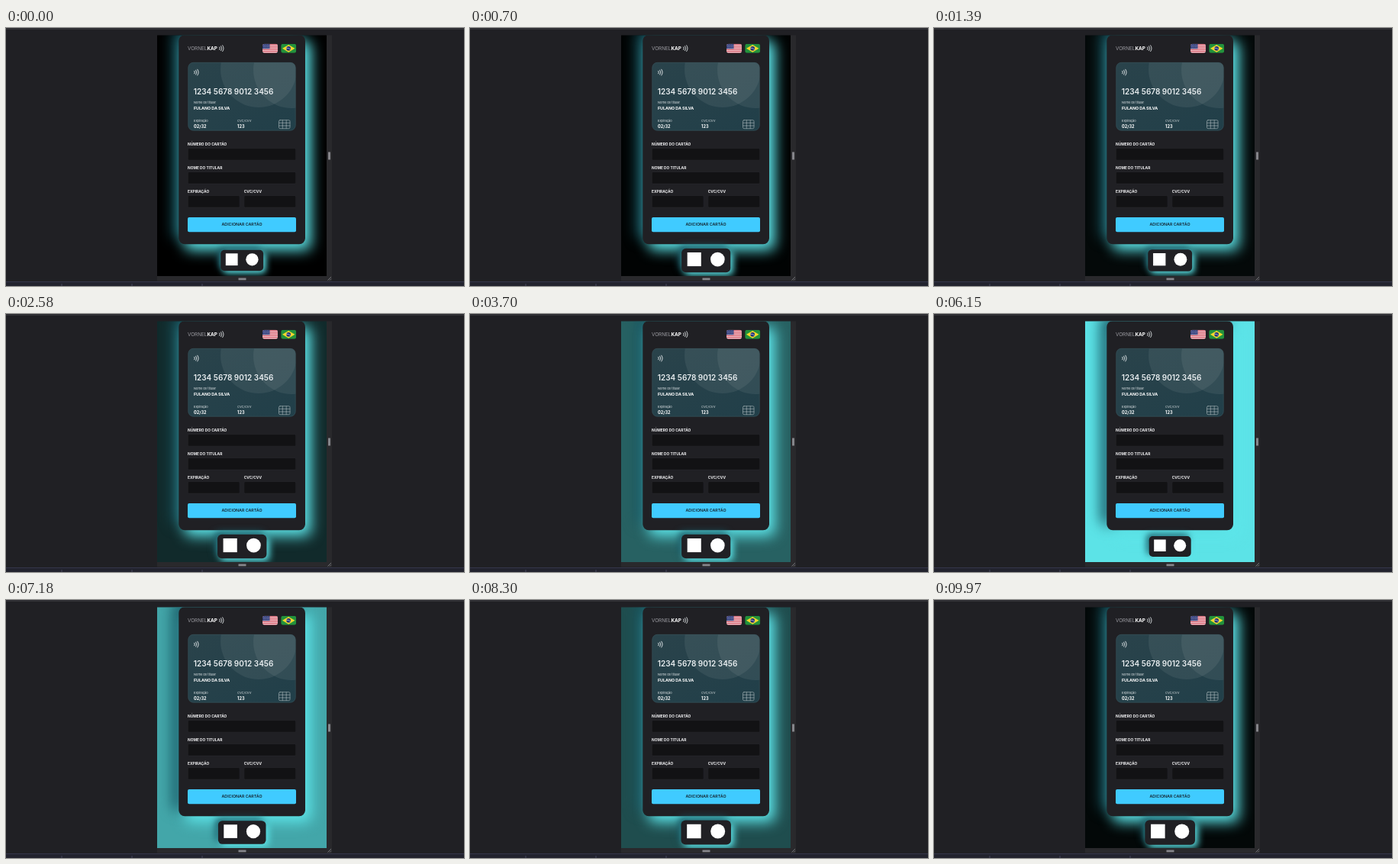
Recreate the animation shown at these times as an HTML page. Size 600x338 px, loop 10 s.

```html
<!DOCTYPE html>
<html lang="pt-BR">
<head>
<meta charset="utf-8">
<title>Cartão</title>
<style>
  html, body { margin: 0; width: 100%; height: 100%; overflow: hidden; background: #202024; }
  svg { display: block; width: 100vw; height: 100vh; }
  text { font-family: Inter, Roboto, sans-serif; fill: #fff; }
  .b { font-weight: 700; }
  .label { font-size: 4.85px; font-weight: 700; fill: #f2f2f4; }
  .small { font-size: 4px; fill: #e4e8ea; }
  .field { fill: #121214; stroke: #29292e; stroke-width: .6; }
  .panel { fill: #202024; }
  .line { fill: none; stroke-linecap: round; }
</style>
</head>
<body>
<svg viewBox="0 0 600 338" preserveAspectRatio="none">
  <defs>
    <clipPath id="page"><rect x="198" y="9.5" width="222" height="315.5"/></clipPath>
    <clipPath id="bank"><rect x="238.5" y="45" width="141" height="89.5" rx="7"/></clipPath>
    <clipPath id="flag"><rect width="20" height="12" rx="3"/></clipPath>
    <linearGradient id="face" x1="0" y1="0" x2="1" y2="1">
      <stop offset="0" stop-color="#2a434b"/>
      <stop offset="1" stop-color="#213f49"/>
    </linearGradient>
    <filter id="wide" x="-40%" y="-40%" width="180%" height="180%" color-interpolation-filters="sRGB">
      <feGaussianBlur stdDeviation="9"/>
    </filter>
    <filter id="near" x="-60%" y="-90%" width="220%" height="280%" color-interpolation-filters="sRGB">
      <feGaussianBlur stdDeviation="4"/>
    </filter>
    <g id="waves" class="line" stroke="#e6eaec" stroke-width=".9">
      <path d="M0 2.8Q1.2 4.5 0 6.2M2 1.6Q4 4.5 2 7.4M4 .6Q6.8 4.5 4 8.4"/>
    </g>
  </defs>

  <rect width="600" height="338" fill="#202024"/>
  <rect width="600" height="2" fill="#2c2c31"/>
  <rect y="1.2" width="600" height=".8" fill="#38383d"/>
  <rect x="420" y="9.5" width="7" height="322" fill="#29292c"/>
  <rect x="198" y="325" width="229" height="6.5" fill="#29292c"/>
  <rect x="422" y="162.5" width="3" height="10" fill="#85858a"/>
  <rect x="304.5" y="327.5" width="10" height="2.8" fill="#85858a"/>
  <path d="M421.5 330.5L426 326M424 330.5L426 328.5" stroke="#85858a" stroke-width=".8"/>
  <rect y="332" width="600" height="6" fill="#22232e"/>
  <rect y="332" width="600" height="1" fill="#34364a"/>
  <path d="M73 335V338M165 335V338M257 335V338" stroke="#44465a"/>

  <g clip-path="url(#page)">
    <rect id="back" x="198" y="9" width="222" height="317"/>
    <g filter="url(#wide)"><rect x="218.5" y="2" width="165.5" height="274" rx="8" fill="#185763"/></g>
    <g filter="url(#wide)"><rect x="234" y="17" width="165.5" height="274" rx="8" fill="#5ee8ec"/></g>
    <rect class="panel" x="226.3" y="9" width="165.7" height="274.3" rx="8"/>
    <g id="tile">
      <g filter="url(#near)"><rect x="-30.5" y="-16.5" width="55" height="27" rx="5" fill="#185763"/></g>
      <g filter="url(#near)"><rect x="-24.5" y="-10.5" width="55" height="27" rx="5" fill="#5ee8ec"/></g>
      <rect class="panel" x="-27.5" y="-13.5" width="55" height="27" rx="5"/>
      <rect x="-21" y="-9" width="15.5" height="15.5" fill="#fff"/>
      <circle cx="13" cy="-1.2" r="8" fill="#fff"/>
    </g>
  </g>

  <text x="238" y="28.8" font-size="6.4" style="fill:#9a9aa0">VORNEL<tspan class="b" fill="#fff" style="fill:#fff">KAP</tspan></text>
  <use href="#waves" x="279.7" y="22.2"/>

  <g transform="translate(336 20.8)" clip-path="url(#flag)">
    <rect width="20" height="12" fill="#f3eef0"/>
    <g id="stripes" fill="#d33a4c"></g>
    <rect width="9.5" height="6.46" fill="#343f7c"/>
    <path id="stars" stroke="#dfe3f2" stroke-width=".55" stroke-dasharray=".55 1.1" d="M1 1.2H9M1.8 2.6H9M1 4H9M1.8 5.4H9"/>
  </g>
  <g transform="translate(360.2 20.8)" clip-path="url(#flag)">
    <rect width="20" height="12" fill="#23923c"/>
    <path d="M10 1.1L18.2 6L10 10.9L1.8 6Z" fill="#f6d72c"/>
    <circle cx="10" cy="6" r="2.9" fill="#25357c"/>
    <path class="line" d="M7.3 5.4Q10.2 5 12.5 7.2" stroke="#e8ecf4" stroke-width=".6"/>
  </g>

  <g clip-path="url(#bank)">
    <rect x="238" y="45" width="142" height="90" fill="url(#face)"/>
    <circle cx="331" cy="54" r="50" fill="#fff" opacity=".065"/>
    <circle cx="374" cy="55" r="50" fill="#fff" opacity=".065"/>
  </g>
  <rect x="238.8" y="45.3" width="140.4" height="88.9" rx="6.7" fill="none" stroke="#3b555d" stroke-width=".5"/>
  <use href="#waves" x="246.8" y="53.6"/>
  <text x="245.8" y="87" font-size="10" font-weight="600" style="fill:#e9eef0">1234 5678 9012 3456</text>
  <text x="246" y="98.7" class="small">Nome do titular</text>
  <text x="246" y="106.7" class="b" font-size="5.3">FULANO DA SILVA</text>
  <text x="246" y="123.2" class="small">Expiração</text>
  <text x="303" y="123.2" class="small">CVC/CVV</text>
  <text x="246" y="131.2" class="b" font-size="5.6">02/32</text>
  <text x="303" y="131.2" class="b" font-size="5.6">123</text>
  <g class="line" stroke="#9aa8ad" stroke-width=".7">
    <rect x="357.5" y="120.7" width="14.5" height="11" rx="1.5"/>
    <path d="M357.5 124.3H362.3M357.5 128H362.3M367.2 124.3H372M367.2 128H372M362.3 120.7V131.7M367.2 120.7V131.7M362.3 124.3H367.2M362.3 128H367.2"/>
  </g>

  <text x="238" y="153.7" class="label">NÚMERO DO CARTÃO</text>
  <rect class="field" x="238.3" y="157.6" width="141.4" height="15.6" rx="1.5"/>
  <text x="238" y="184.6" class="label">NOME DO TITULAR</text>
  <rect class="field" x="238.3" y="188.5" width="141.4" height="15.6" rx="1.5"/>
  <text x="238" y="215.5" class="label">EXPIRAÇÃO</text>
  <rect class="field" x="238.3" y="219.5" width="67.8" height="15.6" rx="1.5"/>
  <text x="311.7" y="215.5" class="label">CVC/CVV</text>
  <rect class="field" x="311.9" y="219.5" width="67.8" height="15.6" rx="1.5"/>
  <rect x="238" y="248" width="142" height="19.2" rx="2" fill="#40cbff"/>
  <text x="309" y="259.4" font-size="5.3" font-weight="600" text-anchor="middle" style="fill:#15262f">ADICIONAR CARTÃO</text>
</svg>
<script>
  const LOOP = 10000, PULSE = 1500, REST = 150;
  const CYAN = [94, 232, 236];
  // time in ms, share of cyan in the page colour
  const KEYS = [[0, 0], [1390, .04], [2580, .18], [4670, .64], [6150, .98], [8300, .33], [9970, .035], [10000, .03]];
  const $ = id => document.getElementById(id);
  const back = $('back'), tile = $('tile');

  $('stripes').innerHTML = Array.from({ length: 7 }, (_, i) =>
    `<rect y="${i * 24 / 13}" width="20" height="${12 / 13}"/>`).join('');

  function slope(i) {
    const a = KEYS[Math.max(i - 1, 0)], b = KEYS[Math.min(i + 1, KEYS.length - 1)];
    return (b[1] - a[1]) / (b[0] - a[0]);
  }

  // Hermite curve through the keys
  function level(t) {
    let i = 0;
    while (i < KEYS.length - 2 && t >= KEYS[i + 1][0]) i++;
    const [t0, a] = KEYS[i], [t1, b] = KEYS[i + 1];
    const d = t1 - t0, u = (t - t0) / d, v = 1 - u;
    const y = a * v * v * (1 + 2 * u) + b * u * u * (3 - 2 * u)
      + d * u * v * (slope(i) * v - slope(i + 1) * u);
    return Math.min(1, Math.max(0, y));
  }

  function draw(t) {
    const p = level(t);
    back.setAttribute('fill', `rgb(${CYAN.map(c => Math.round(c * p)).join(',')})`);
    const scale = 1.1 - .1 * Math.cos((t - REST) / PULSE * 2 * Math.PI);
    tile.setAttribute('transform', `translate(309.2 304.5) scale(${scale.toFixed(4)})`);
  }

  const start = performance.now();
  function tick(now) {
    draw(Math.max(0, now - start) % LOOP);
    requestAnimationFrame(tick);
  }
  draw(0);
  requestAnimationFrame(tick);
</script>
</body>
</html>
```
